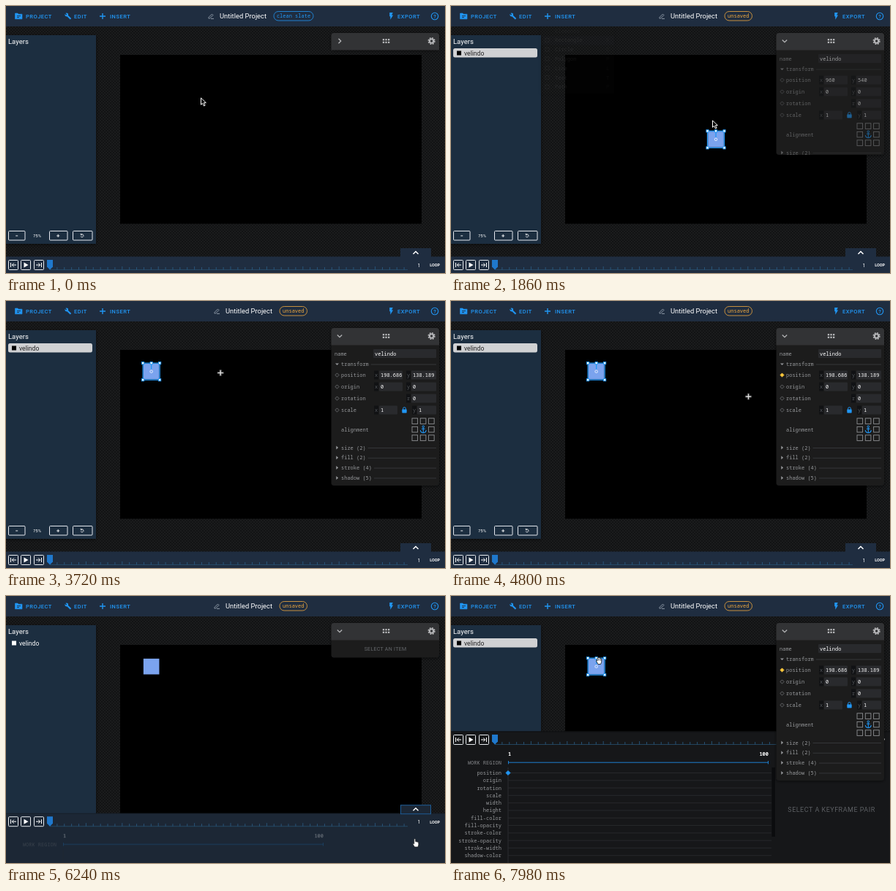
An HTML page that plays this animation: 600x366 px, repeating every 8000 ms.

```html
<!DOCTYPE html>
<html lang="en">
<head>
<meta charset="utf-8">
<title>Editor walkthrough</title>
<style>
html, body { margin: 0; width: 100%; height: 100%; overflow: hidden; background: #141414; }
svg { display: block; width: 600px; height: 366px; }
text { font-family: Roboto, Inter, sans-serif; white-space: pre; }
.mono { font-family: "Noto Sans Mono", "DejaVu Sans Mono", monospace; }
</style>
</head>
<body>
<svg id="stage" viewBox="0 0 600 366"></svg>
<script>
const LOOP = 8000;
const NAVY = '#1f2d40', BLUE = '#2196f3', ORANGE = '#f0a93e';
const ITEM = 'velindo';

// drawing helpers
const rect = (x, y, w, h, fill, more = '') =>
  `<rect x="${x}" y="${y}" width="${w}" height="${h}" fill="${fill}" ${more}/>`;
const path = (d, stroke, width = 1, fill = 'none', more = '') =>
  `<path d="${d}" stroke="${stroke}" stroke-width="${width}" fill="${fill}" ${more}/>`;
const circle = (x, y, r, fill, more = '') => `<circle cx="${x}" cy="${y}" r="${r}" fill="${fill}" ${more}/>`;
const text = (x, y, s, size, fill, more = '') =>
  `<text x="${x}" y="${y + size * .36}" font-size="${size}" fill="${fill}" ${more}>${s}</text>`;
const mono = (x, y, s, fill, more = '') => text(x, y, s, 7, fill, 'class="mono" ' + more);
const group = (id, body, more = '') => `<g id="${id}" ${more}>${body}</g>`;
const repeat = (n, f) => Array.from({ length: n }, (_, i) => f(i)).join('');
const END = 'text-anchor="end"', MID = 'text-anchor="middle"';
const caps = (x, y, s) => text(x, y, s, 7.5, BLUE, 'font-weight="500" letter-spacing=".5"');
const diamond = (x, y, r, fill, stroke, id = '') =>
  path(`M${x} ${y - r}l${r} ${r}l${-r} ${r}l${-r} ${-r}z`, stroke, .8, fill, id && `id="${id}"`);
const pencil = x => path(`M${x - 3} 15.5l4.5 -4.5l1.5 1.5l-4.5 4.5h-1.5z`, '#8c97a5', 1)
  + path(`M${x} 17.4h4`, '#8c97a5', 1);
const title = (x, label, width, color, weight) =>
  pencil(x) + text(x + 12, 14, 'Untitled Project', 9.4, '#fff')
  + rect(x + 86, 7.5, width, 12.5, 'none', `rx="6.2" stroke="${color}" stroke-width=".8"`)
  + mono(x + 86 + width / 2, 13.8, label, color, `${MID} font-weight="${weight}"`);

function header() {
  return rect(0, 0, 600, 28, NAVY)
    + path('M12.5 10h3.5l1 1.2h5v6.6h-9.5z', BLUE, .6, BLUE) + path('M15 13.6h5M15 15.6h3', NAVY, .9)
    + caps(27, 14, 'PROJECT')
    + path('M83 12.5l5.5 5.3', BLUE, 2.1) + circle(82.8, 12, 2.4, BLUE) + path('M80 9.5l2.6 2.4', NAVY, 1.4)
    + caps(93, 14, 'EDIT')
    + path('M132 10v8M128 14h8', BLUE, 1.4) + caps(142, 14, 'INSERT')
    + group('cleanTitle', title(280, 'clean slate', 54, BLUE, 400))
    + group('dirtyTitle', title(288, 'unsaved', 37.5, ORANGE, 500))
    + path('M524.2 9h4.6l-1.7 3.5h2l-3.8 6.3v-4.6h-1.1z', 'none', 0, BLUE) + caps(535, 14, 'EXPORT')
    + circle(586, 14, 4.7, 'none', `stroke="${BLUE}" stroke-width="1.1"`)
    + text(586, 14.1, '?', 7.5, BLUE, MID + ' font-weight="500"');
}

function layers() {
  const button = (x, w) => rect(x + .5, 308.5, w, 12.5, 'none', 'stroke="#e4e8ee" rx="1"');
  return rect(0, 40, 123, 286, NAVY, 'filter="url(#shade)"')
    + text(3, 49, 'Layers', 9.5, '#fff')
    + group('layer', rect(3, 58, 115, 12.5, '#d0d1d3', 'rx="2.5" id="layerBack"')
      + rect(8, 61.5, 6, 6, '#000', 'id="layerIcon"') + text(18, 64.5, ITEM, 8.6, '#222', 'id="layerName"'))
    + button(3, 22.5) + button(59, 24.5) + button(91, 26.5)
    + path('M13.2 315h3M69.2 315h4M71.2 313v4', '#fff', .9)
    + text(42.5, 315, '75%', 6, '#fff', MID)
    + path('M102.6 313.4a2 2 0 1 1 -.5 2.2M102.3 311.8v2h2', '#fff', .8);
}

function insertMenu() {
  const names = ['Elements', 'Rectangle', 'Circle', 'Polygon', 'Line', 'Text', 'Path'];
  return rect(122, 28, 101, 92, '#1b1c1f', 'filter="url(#shade)"')
    + rect(122, 41, 101, 12.5, '#303338', 'id="menuHover"')
    + names.map((s, i) => mono(142, 34 + i * 12.8, s, i ? '#ccc' : '#777')
      + (i ? rect(129, 31.5 + i * 12.8, 5, 5, 'none', 'stroke="#999" stroke-width=".8"')
        + mono(212, 34 + i * 12.8, s[0], '#777') : '')).join('');
}

function properties() {
  const grey = '#96989b';
  const field = (x, w, y, tag, id, value) =>
    (tag ? rect(x - 7, y - 6, 6, 12, '#111214') + mono(x - 6, y, tag, '#55585c') : '')
    + rect(x, y - 6, w, 12, '#292a2d', 'rx="1"') + mono(x + 2, y, value, '#fff', id ? `id="${id}"` : '');
  const row = (y, label, id) => diamond(452.5, y, 2.6, 'none', '#77797d', id) + mono(458, y, label, grey);
  const section = (y, label, open) =>
    path(open ? `M450 ${y - 1}h5l-2.5 2.6z` : `M451.3 ${y - 2.5}v5l2.8 -2.5z`, 'none', 0, grey)
    + mono(458, y, label, grey) + path(`M${461 + label.length * 4.2} ${y + .5}H588`, '#343639');
  const body = mono(449, 72, 'name', grey) + field(502, 86, 72, '', '', ITEM)
    + section(86.5, 'transform', true)
    + row(101.5, 'position', 'posKey') + field(510, 32, 101.5, 'x', 'posX', '') + field(554, 34, 101.5, 'y', 'posY', '')
    + row(117.5, 'origin') + field(510, 32, 117.5, 'x', '', 0) + field(554, 34, 117.5, 'y', '', 0)
    + row(133.5, 'rotation') + field(554, 34, 133.5, 'r', '', 0)
    + row(149.5, 'scale') + field(510, 25, 149.5, 'x', '', 1) + field(562, 26, 149.5, 'y', '', 1)
    + rect(541.3, 148.5, 6.4, 5, BLUE, 'rx=".8"') + path('M542.6 149v-1.4a1.9 1.9 0 0 1 3.8 0v1.4', BLUE)
    + mono(458, 176, 'alignment', grey)
    + repeat(9, i => i === 4 ? '' : rect(555 + i % 3 * 11.3, 160.8 + (i / 3 | 0) * 11.5, 7.6, 7.6, 'none', 'stroke="#8d8f92" stroke-width=".9"'))
    + path('M570.3 173.5v7M567.9 175.2h4.8M566.3 177.2q.6 3.4 4 3.6q3.4 -.2 4 -3.6', BLUE, 1.1)
    + circle(570.3, 172.2, 1.3, 'none', `stroke="${BLUE}"`)
    + ['size (2)', 'fill (2)', 'stroke (4)', 'shadow (5)'].map((s, i) => section(201 + i * 13.8, s)).join('');
  return rect(444.5, 37, 147.5, 24, '#1a1b1d', 'rx="4" id="panelBack" filter="url(#shade)"')
    + group('panelBody', body, 'clip-path="url(#panelClip)"')
    + text(518.5, 72.5, 'SELECT AN ITEM', 7, '#66696d', MID + ' letter-spacing=".3" id="panelEmpty"')
    + path('M444.5 60.5V41q0 -4 4 -4h139.5q4 0 4 4V60.5z', 'none', 0, '#323335')
    + path('M454.5 44.8l3.2 3.2l-3.2 3.2', '#b4b5b7', 1.3, 'none', 'id="chevron"')
    + repeat(6, i => rect(514.8 + i % 3 * 3.6, 45 + (i / 3 | 0) * 3.7, 2.3, 2.3, '#b4b5b7'))
    + circle(581.6, 48, 2.7, 'none', 'stroke="#b4b5b7" stroke-width="2.1"')
    + circle(581.6, 48, 4.3, 'none', 'stroke="#b4b5b7" stroke-width="1.6" stroke-dasharray="1.9 1.477"');
}

function timeline() {
  const rows = ['position', 'origin', 'rotation', 'scale', 'width', 'height', 'fill-color', 'fill-opacity',
    'stroke-color', 'stroke-opacity', 'stroke-width', 'shadow-color'];
  const LINE = '#1d7fd0';
  const box = x => rect(x + .5, 348.5, 13, 13, 'none', 'stroke="#e8ecf0" rx="1"');
  const rowY = i => 400.5 + i * 10.29;
  const hint = (x, y, s) => text(x, y, s, 9, '#5d6064', MID + ' letter-spacing=".5"');
  return rect(0, 343.5, 600, 182, NAVY, 'id="timeBack"') + path('M0 344H600', '#0c0e11', 1, 'none', 'id="timeEdge"')
    + rect(539.5, 332.5, 41, 12, NAVY, `stroke="${NAVY}" id="tab"`)
    + group('tabArrow', path('M-3.5 1.8L0 -1.7L3.5 1.8', '#fff', 1.5))
    + box(3) + box(20) + box(38)
    + path('M6.5 352v6M14 355H8.5M10.8 352.5l-2.5 2.5l2.5 2.5', '#fff', 1)
    + path('M24.5 351.5v7l6 -3.5z', 'none', 0, '#fff')
    + path('M48.5 352v6M41 355h5.5M44.2 352.5l2.5 2.5l-2.5 2.5', '#fff', 1)
    + path('M60 361.5H549', '#27506f', .8)
    + repeat(50, i => path(`M${60 + i * 9.88} ${i % 5 ? 358 : 357}V361.5`, '#2c5f88', .8))
    + path('M56 348h8v9.5l-4 4l-4 -4z', 'none', 0, '#1f78cc')
    + text(564.5, 355.5, '1', 7, '#fff', MID) + text(586.2, 355.5, 'LOOP', 5.4, '#fff', MID + ' font-weight="700"')
    + group('timeBody',
      mono(78, 374, '1', '#fff', 'font-weight="700"') + mono(434, 374, '100', '#fff', END + ' font-weight="700"')
      + mono(69, 386, 'WORK REGION', '#85878a', END)
      + path('M78.5 386.2H433.5', LINE, 1) + path('M78.5 384v4.4M433.5 384v4.4', LINE, 1)
      + path('M78 393V524', '#2a2d31')
      + group('emptyRows', hint(223, 457, 'SELECT AN ITEM'))
      + group('itemRows', rows.map((s, i) => mono(69, rowY(i), s, '#96989b', END)
        + path(`M78 ${rowY(i)}H438`, '#26282b')).join('')
        + rect(438.5, 393, 4.5, 95, '#0b0c0e') + diamond(78, 400.5, 3.1, BLUE, BLUE))
      + hint(520, 451, 'SELECT A KEYFRAME PAIR'));
}

function square() {
  const handle = (x, y) => rect(x - 1.6, y - 1.6, 3.2, 3.2, '#fff', `stroke="${BLUE}" stroke-width=".9"`);
  const R = 11.5;
  return rect(-10.8, -10.8, 21.6, 21.6, '#7ba3ee')
    + group('selection', rect(-R, -R, 2 * R, 2 * R, 'none', `stroke="${BLUE}" stroke-width="1.3"`)
      + path(`M0 ${-R}V-3`, BLUE, 1.3) + circle(0, 0, 1.8, 'none', 'stroke="#e9f1ff" stroke-width=".9"')
      + handle(-R, -R) + handle(R, -R) + handle(-R, R) + handle(R, R) + handle(0, -R));
}

const cursors = {
  arrow: path('M0 0V9.3l2.2 -2l1.7 3.7l1.7 -.8l-1.7 -3.5h3z', '#fff', 1, '#000'),
  cross: path('M-1.1 -4.1h2.2v3h3v2.2h-3v3h-2.2v-3h-3v-2.2h3z', '#444', .8, '#d8d8d8'),
  hand: path('M-2 4.5l-2.5 -4.5q0 -1.5 1.6 -.4l-.4 -3q.8 -1 1.4 0l.3 -1q.9 -.8 1.4 0l.2 .6q1 -.6 1.4 .3l.3 .6q1 -.3 1.2 .6q.2 4.5 -1.4 6.8z', '#111', .8, '#fff')
    + path('M-1.5 -3v2.6M.3 -3.4v3M2 -2.6v2.4', '#111', .6),
  pointer: path('M-1.5 7l-2.5 -4q0 -1.5 1.8 -.3v-6.2q1 -1.3 1.9 0v3l4 .9q.8 3.5 -.7 6.6z', '#222', .7, '#fff')
};

document.getElementById('stage').innerHTML = `<defs>
  <pattern id="weave" width="4" height="4" patternUnits="userSpaceOnUse">
    ${rect(0, 0, 4, 4, '#121314') + rect(0, 0, 2, 2, '#1b1c1d') + rect(2, 2, 2, 2, '#1b1c1d')}</pattern>
  <filter id="shade" x="-20%" y="-20%" width="140%" height="150%"><feDropShadow dx="0" dy="1" stdDeviation="2" flood-opacity=".55"/></filter>
  <clipPath id="panelClip">${rect(444, 60, 149, 10, '#000', 'id="panelClipBox"')}</clipPath></defs>`
  + rect(0, 0, 600, 366, 'url(#weave)') + rect(156, 67, 412, 231.5, '#000')
  + group('square', square()) + layers() + group('timeline', timeline())
  + group('panel', properties()) + header() + group('menu', insertMenu())
  + circle(0, 0, 17.8, 'none', 'id="ring" stroke="#b9bbbd" stroke-width=".9"')
  + Object.entries(cursors).map(([k, v]) => group(k, v)).join('');

const el = {};
document.querySelectorAll('svg [id]').forEach(n => el[n.id] = n);
const set = (id, attrs) => { for (const k in attrs) el[id].setAttribute(k, attrs[k]); };
const show = (id, on) => set(id, { opacity: +on });
const move = (id, x, y) => set(id, { transform: `translate(${x} ${y})` });

// motion: keys are [time, ...values]; eased between neighbours
const smooth = p => p * p * (3 - 2 * p);
function track(keys, t, ease = smooth) {
  const i = keys.findIndex(k => k[0] > t);
  if (i === 0) return keys[0].slice(1);
  if (i < 0) return keys.at(-1).slice(1);
  const a = keys[i - 1], b = keys[i], p = ease((t - a[0]) / (b[0] - a[0]));
  return a.slice(1).map((v, j) => v + (b[j + 1] - v) * p);
}
const fade = (t, from, to) => smooth(Math.min(1, Math.max(0, (t - from) / (to - from))));

const INSERT = 1680, PRESS = 2160, DROP = 3200, KEYED = 4200, DESELECT = 5020, EXPAND = 6120, RESELECT = 7500;
const pointerPath = [[0, 266.5, 126], [150, 266.5, 126], [620, 150, 15], [950, 150, 15], [1250, 156, 45],
  [1640, 158, 46], [1860, 357.5, 157], [2020, 361, 181], [PRESS, 361, 181]];
const afterDrop = [[DROP, 198, 97], [3480, 198, 97], [4060, 452, 101], [4460, 452, 101], [4800, 406.5, 131],
  [5120, 392, 142], [5580, 561, 304], [5850, 560, 337], [6250, 560, 337], [6600, 563.5, 336.5],
  [6850, 563.5, 336.5], [7420, 203, 89], [LOOP, 203, 89]];
const panelBottom = [[1700, 60], [1940, 253], [DESELECT, 253], [DESELECT + 220, 84.5], [RESELECT, 84.5], [RESELECT + 220, 253]];
const cursorKinds = [[0, 'arrow'], [500, 'pointer'], [1660, 'arrow'], [2000, 'hand'], [3560, 'cross'],
  [3960, 'pointer'], [4560, 'cross'], [5760, 'pointer'], [6280, 'arrow'], [7380, 'hand']];

function position(t) {
  if (t < 2880) return track([[PRESS, 960, 540], [2880, 320.726, 179.763]], t, p => p * p * (2 - p));
  return track([[2880, 320.726, 179.763], [DROP, 198.686, 138.189]], t, p => p * (2 - p));
}

function pointerAt(t, x, y) {
  if (t < PRESS) return track(pointerPath, t);
  if (t >= DROP) return track(afterDrop, t);
  const lead = track([[PRESS, -1, -1.5], [2600, -12, -1.5], [2880, -12, -1.5], [DROP, -.6, .4]], t);
  return [x + lead[0], y + lead[1]];
}

function render(t) {
  const inserted = t >= INSERT;
  const selected = inserted && t < DESELECT || t >= RESELECT;
  const [px, py] = position(t);
  const x = 156 + px * .2146, y = 67 + py * .2146;

  show('cleanTitle', !inserted);
  show('dirtyTitle', inserted);
  show('square', inserted);
  show('layer', inserted);
  show('selection', selected);
  move('square', x, y);
  show('layerBack', selected);
  set('layerIcon', { fill: selected ? '#000' : '#fff' });
  set('layerName', { fill: selected ? '#222' : '#fff' });

  show('menu', fade(t, 700, 860) * (1 - fade(t, INSERT, 1900)));
  show('menuHover', t > 1180);

  const bottom = track(panelBottom, t)[0];
  set('panelBack', { height: bottom - 37 });
  set('panelClipBox', { height: Math.max(0, bottom - 60) });
  show('panelBody', t < DESELECT + 120 ? fade(t, 1760, 1950) * (1 - fade(t, DESELECT, DESELECT + 120))
    : fade(t, RESELECT + 50, RESELECT + 260));
  show('panelEmpty', fade(t, DESELECT + 80, DESELECT + 240) * (1 - fade(t, RESELECT, RESELECT + 100)));
  set('chevron', { transform: `rotate(${90 * fade(t, 1690, 1850)} 456 48)` });
  set('posKey', t >= KEYED ? { fill: '#ffc93c', stroke: '#ffc93c' } : { fill: 'none', stroke: '#77797d' });
  el.posX.textContent = +px.toFixed(3);
  el.posY.textContent = +py.toFixed(3);

  const open = fade(t, EXPAND, EXPAND + 340);
  const mix = [31, 45, 64].map((v, i) => Math.round(v + ([22, 23, 25][i] - v) * open));
  move('timeline', 0, -158 * open);
  set('timeBack', { fill: `rgb(${mix})` });
  set('tab', { stroke: t >= EXPAND ? '#1d5c96' : NAVY, fill: `rgb(${mix})` });
  set('tabArrow', { transform: `translate(560 338.2) scale(1 ${open < .5 ? 1 : -1})` });
  show('timeEdge', open);
  show('timeBody', open);
  show('emptyRows', !selected);
  show('itemRows', selected);

  const [cx, cy] = pointerAt(t, x, y);
  const kind = cursorKinds.filter(k => k[0] <= t).at(-1)[1];
  for (const k in cursors) { show(k, k === kind); move(k, cx, cy); }
  show('ring', t >= PRESS && t < DROP);
  move('ring', cx, cy - .7);
}

const start = performance.now();
function tick() {
  render((performance.now() - start) % LOOP);
  requestAnimationFrame(tick);
}
tick();
</script>
</body>
</html>
```
